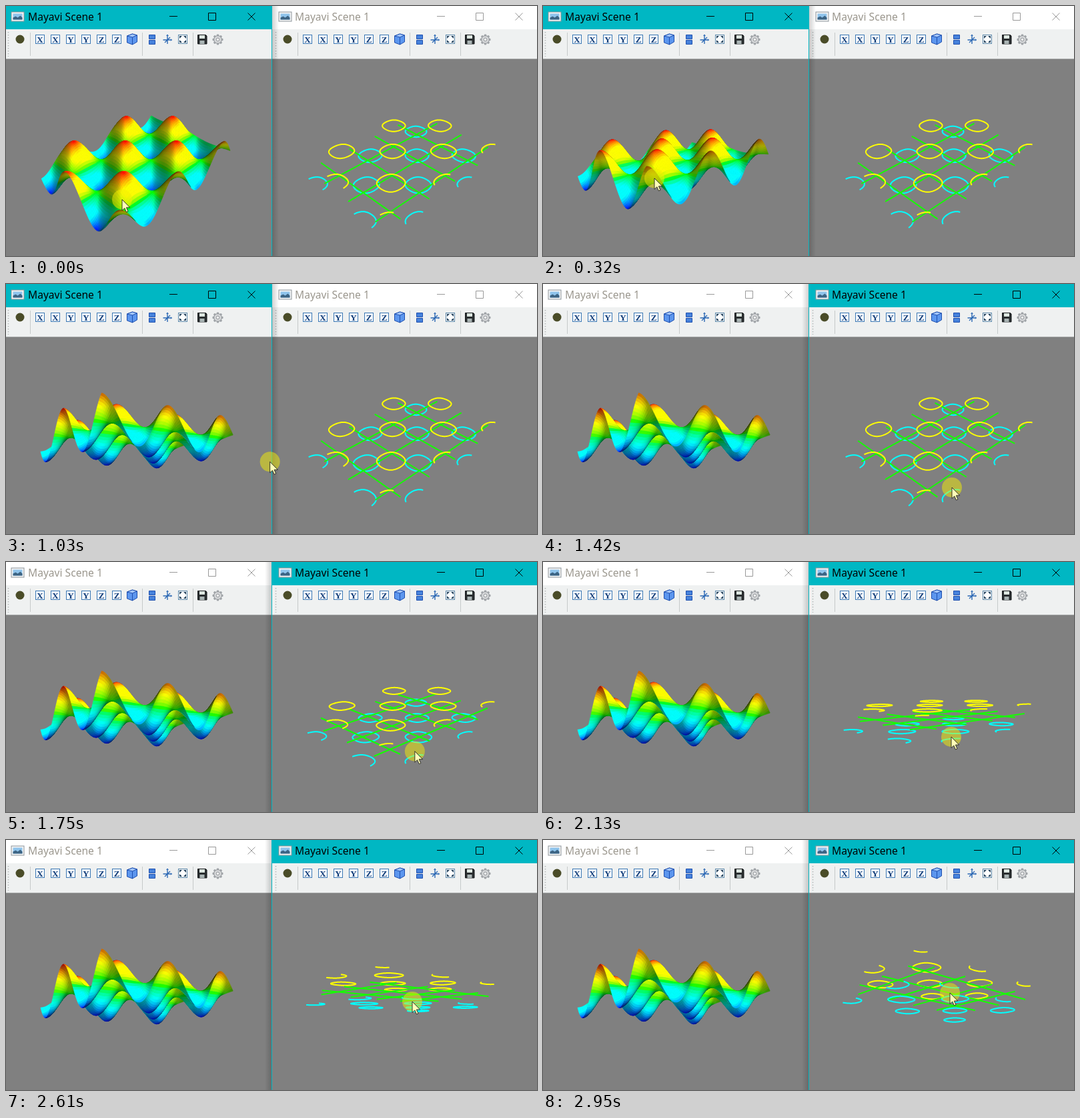
An HTML page with a canvas that plays this animation: 796 px wide and 376 px high, repeating every 3010 ms.

```html
<!DOCTYPE html>
<html lang="en">
<head>
<meta charset="utf-8">
<title>Surface and contours</title>
<style>
  html, body { margin: 0; width: 100%; height: 100%; overflow: hidden; background: #808080; }
  canvas, svg { position: absolute; left: 0; top: 0; width: 796px; height: 376px; }
  .title { font: 15.6px "Noto Sans", "Open Sans", sans-serif; }
  .axis { font: bold 13px "Liberation Serif", "Noto Serif", serif; fill: #123c78; text-anchor: middle; }
  .win { color: #999; }
  .win.on { color: #000; }
  .bar { fill: #fff; }
  .on .bar { fill: #00b7c3; }
  .label { fill: #9b978e; }
  .on .label { fill: #000; }
  .edge { display: none; }
  .on .edge { display: inline; }
</style>
</head>
<body>
<canvas id="scene" width="796" height="376"></canvas>
<svg viewBox="0 0 796 376">
  <defs>
    <linearGradient id="fadeR"><stop stop-opacity=".18"/><stop offset="1" stop-opacity="0"/></linearGradient>
    <linearGradient id="fadeL"><stop stop-opacity="0"/><stop offset="1" stop-opacity=".18"/></linearGradient>
    <g id="photo">
      <rect x="8" y="9" width="19" height="14" fill="#f4f4f4" stroke="#8d959b"/>
      <rect x="10.500" y="11.500" width="14" height="9" fill="#8fc4ec"/>
      <path d="M10.500 20.500v-3l4-2 3 2 4-3 3 3v3z" fill="#3c6484"/>
    </g>
    <g id="controls" fill="none" stroke="currentColor">
      <path d="M245 15.500h12M303.500 10.500h11v11h-11zM362.500 10.500l11 11M373.500 10.500l-11 11"/>
    </g>
    <g id="tools"></g>
    <path id="arrow" d="M0 0v16.500l3.800-3.500 2.600 6 2.600-1.100-2.600-5.900h5.300z"/>
  </defs>
  <g id="wins"></g>
  <g id="pointer">
    <circle r="15" fill="#f4ee04" fill-opacity=".5"/>
    <use href="#arrow" fill="#ffffb8" stroke="#222" stroke-width=".9"/>
  </g>
</svg>
<script>
const $ = id => document.getElementById(id);
const ctx = $('scene').getContext('2d');
const LOOP = 3010, FOCUS = 1420;

// ---- window chrome ----
const axisIcon = (letter, i) => {
  const x = 51 + 23 * i;
  return `<rect x="${x - 6.5}" y="43.500" width="13" height="13" fill="#f5faff" stroke="#3c78b4"/>
    <text class="axis" x="${x}" y="54.500">${letter}</text>`;
};
const teeth = [...Array(8)].map((_, i) =>
  `<rect x="-1.700" y="-8" width="3.400" height="4" rx="1" transform="rotate(${i * 45})"/>`).join('');

$('tools').innerHTML = `
  <path d="M3.500 39v37" stroke="#b4b8b8" stroke-width="1.500" stroke-dasharray="1.500 2.500"/>
  <path d="M36.500 40v35M204.500 40v35M280.500 40v35" stroke="#c6caca"/>
  <circle cx="21" cy="50" r="6.500" fill="#4a4c28"/>
  ${[...'XXYYZZ'].map(axisIcon).join('')}
  <g stroke="#1e4fae" stroke-linejoin="round">
    <path d="M181.500 45l8-3 7 2v10l-7 4-8-3z" fill="#5c96ee"/>
    <path d="M181.500 45l8 2 7-3-7-2z" fill="#a4c8ff"/>
    <path d="M189.500 47v11" fill="none"/>
    <path d="M214.500 43.500h9v6h-9zM214.500 51.500h9v6h-9z" fill="#4682dc"/>
  </g>
  <g stroke="#2c68b4" stroke-width="1.400" fill="none">
    <path d="M242 43v14M235.500 51h13M238 55l8-8"/>
    <path d="M240.500 45l1.500-2 1.500 2M247 49.500l1.500 1.500-1.500 1.500" stroke-width="1"/>
  </g>
  <rect x="258.500" y="43.500" width="13" height="13" fill="#fff" stroke="#5a86a8"/>
  <path d="M260 45h4l-4 4zM270 45v4l-4-4zM270 55h-4l4-4zM260 55v-4l4 4z" fill="#1c3c58"/>
  <path d="M287.500 43.500h12l1.500 1.500v12h-13.500z" fill="#2a2e30" stroke="#15191b"/>
  <path d="M290 44h8v5h-8z" fill="#dce6e0"/><path d="M290.500 52h7v5h-7z" fill="#a9b4b4"/>
  <g transform="translate(317.500 50.500)" fill="#a2a6aa">
    ${teeth}<circle r="5.800" fill="#d4d6d8" stroke="#92969a"/>
    <circle r="2.300" fill="#f4f4f4" stroke="#92969a"/>
  </g>`;

const frame = (id, left, dx, edge) => `
  <g id="${id}" class="win">
    <rect class="bar" x="${left}" width="${id === 'w0' ? 399 : 398}" height="35"/>
    <rect x="${left}" y="35" width="${id === 'w0' ? 398 : 397}" height="44" fill="#eff1f1"/>
    <path d="M${left} 79.500h398" stroke="#b4b6b6"/>
    <g transform="translate(${dx})">
      <use href="#photo"/><use href="#controls"/><use href="#tools"/>
      <text class="title label" x="${dx ? 32 : 33}" y="22">Mayavi Scene 1</text>
    </g>
    <g class="edge">
      <path d="M398.500 0v376" stroke="#00b7c3"/>
      <rect x="${edge}" width="10" height="376" fill="url(#${id === 'w0' ? 'fadeR' : 'fadeL'})"/>
    </g>
  </g>`;
$('wins').innerHTML = frame('w1', 399, 401, 388) + frame('w0', 0, 0, 399);

// ---- pointer steps and trackball cameras ----
const times = [0, 120, 190, 260, 320, 390, 470, 550, 630, 710, 790, 870, 950, 1030, 1100,
  1180, 1270, 1340, 1420, 1550, 1610, 1750, 1830, 1900, 1980, 2060, 2130, 2220, 2300,
  2380, 2450, 2530, 2610, 2690, 2770, 2860, 2950];
// steps, end x, end y, dragged view (-1: none)
const legs = [[4, 167, 259, 0], [4, 160, 225, 0], [1, 159, 222, 0], [6, 514, 290, -1],
  [2, 613, 306, -1], [1, 613, 306, -1], [2, 613, 289, 1], [6, 612, 263, 1],
  [6, 609, 243, 1], [4, 610, 230, 1]];

const DIST = 34.1;
const dot = (a, b) => a[0] * b[0] + a[1] * b[1] + a[2] * b[2];
const cross = (a, b) => [a[1] * b[2] - a[2] * b[1], a[2] * b[0] - a[0] * b[2], a[0] * b[1] - a[1] * b[0]];
const turn = (a, b, t) => a.map((v, i) => v * Math.cos(t) + b[i] * Math.sin(t));

function orbit(cam, dx, dy) {
  const az = -dx * 200 / 398 * Math.PI / 180;
  const el = dy * 200 / 302 * Math.PI / 180;
  const out = turn(cam.out, cam.right, az);
  const up = turn(cam.up, out, -el);
  const dir = turn(out, cam.up, el);
  return { out: dir, up, right: cross(up, dir) };
}

const s3 = 1 / Math.sqrt(3), s6 = 1 / Math.sqrt(6), s2 = Math.SQRT1_2;
const home = { out: [s3, s3, s3], up: [-s6, -s6, 2 * s6], right: [-s2, s2, 0] };
const states = [{ x: 174, y: 291, cams: [home, home] }];
for (const [n, ex, ey, view] of legs) {
  const from = states[states.length - 1];
  for (let i = 1; i <= n; i++) {
    const last = states[states.length - 1];
    const x = from.x + (ex - from.x) * i / n, y = from.y + (ey - from.y) * i / n;
    const cams = last.cams.slice();
    if (view >= 0) cams[view] = orbit(cams[view], x - last.x, y - last.y);
    states.push({ x, y, cams });
  }
}

function projector(cam, cx, cy, focal) {
  return p => {
    const depth = DIST - dot(p, cam.out), k = focal / depth;
    return [cx + dot(p, cam.right) * k, cy - dot(p, cam.up) * k, depth];
  };
}

// ---- surface: sin(x - y) + cos(x + y) on [-7, 7] x [-5, 5] ----
const height = (x, y) => Math.sin(x - y) + Math.cos(x + y);
const NX = 112, NY = 80;
const gx = i => -7 + 14 * i / NX, gy = j => -5 + 10 * j / NY;
const clamp = v => Math.max(0, Math.min(1, v));
const light = (el, az, power) => {
  const e = el * Math.PI / 180, a = az * Math.PI / 180;
  return { dir: [Math.cos(e) * Math.sin(a), Math.sin(e), Math.cos(e) * Math.cos(a)], power };
};
const lights = [light(45, 45, 1.3), light(-30, -60, .55), light(-30, 60, .45)];

// wide cyan and yellow bands between blue and red
const ramp = f => [4 * f - 2, Math.min(4 * f, 4 - 4 * f), 2 - 4 * f].map(c => clamp(c) ** .55);

function shade(x, y, cam) {
  const z = height(x, y);
  let n = [Math.sin(x + y) - Math.cos(x - y), Math.cos(x - y) + Math.sin(x + y), 1];
  const toEye = cam.out.map((v, i) => v * DIST - [x, y, z][i]);
  const len = Math.hypot(...n) * (dot(n, toEye) < 0 ? -1 : 1);
  n = [cam.right, cam.up, cam.out].map(a => dot(n, a) / len);
  let lit = 0;
  for (const l of lights) lit += l.power * Math.max(0, dot(n, l.dir));
  return `rgb(${ramp((z + 2) / 4).map(c => Math.round(255 * clamp(c * lit)))})`;
}

function drawSurface(cam) {
  const put = projector(cam, 198, 232.5, 572);
  const pts = [];
  for (let i = 0; i <= NX; i++) {
    pts.push([]);
    for (let j = 0; j <= NY; j++) pts[i].push(put([gx(i), gy(j), height(gx(i), gy(j))]));
  }
  const quads = [];
  for (let i = 0; i < NX; i++) for (let j = 0; j < NY; j++) {
    const c = [pts[i][j], pts[i + 1][j], pts[i + 1][j + 1], pts[i][j + 1]];
    quads.push({ c, i, j, depth: c[0][2] + c[1][2] + c[2][2] + c[3][2] });
  }
  quads.sort((a, b) => b.depth - a.depth);
  ctx.lineWidth = .6;
  ctx.lineJoin = 'round';
  for (const { c, i, j } of quads) {
    ctx.fillStyle = ctx.strokeStyle = shade(gx(i + .5), gy(j + .5), cam);
    ctx.beginPath();
    c.forEach(p => ctx.lineTo(p[0], p[1]));
    ctx.closePath();
    ctx.fill();
    ctx.stroke();
  }
}

// ---- contours at -1, 0 and 1 ----
const ring = [...Array(121)].map((_, i) => {
  const t = i * Math.PI / 60, c = Math.cos(t), s = Math.sin(t);
  let lo = 0, hi = Math.PI / 2;
  for (let k = 0; k < 30; k++) {
    const r = (lo + hi) / 2;
    if (Math.cos(r * c) * Math.cos(r * s) > .5) lo = r; else hi = r;
  }
  return [lo * c, lo * s];
});
const curves = { '-1': [], 0: [], 1: [] };
for (let k = -2; k <= 2; k++) {
  const x = Math.PI * (k + .25);
  for (let m = -2; m <= 2; m++) {
    const y = Math.PI * (m - .25);
    const z = (k + m) % 2 ? -1 : 1;
    let run = [];
    for (const [a, b] of ring) {
      const p = [x + a, y + b, z];
      if (Math.abs(p[0]) <= 7 && Math.abs(p[1]) <= 5) run.push(p);
      else if (run.length) { curves[z].push(run); run = []; }
    }
    if (run.length) curves[z].push(run);
  }
  const zx = Math.PI * (k - .25), zy = Math.PI * (k + .25);
  if (Math.abs(zx) < 7) curves[0].push([[zx, -5, 0], [zx, 5, 0]]);
  if (Math.abs(zy) < 5) curves[0].push([[-7, zy, 0], [7, zy, 0]]);
}
const inks = { '-1': '#00ffff', 0: '#14ff00', 1: '#ffff00' };

function drawContours(cam) {
  const put = projector(cam, 598.6, 232.3, 576);
  const order = cam.out[2] > 0 ? [-1, 0, 1] : [1, 0, -1];
  ctx.lineWidth = 2;
  for (const z of order) {
    ctx.strokeStyle = inks[z];
    ctx.beginPath();
    for (const line of curves[z]) line.map(put).forEach((p, i) =>
      i ? ctx.lineTo(p[0], p[1]) : ctx.moveTo(p[0], p[1]));
    ctx.stroke();
  }
}

// ---- playback ----
const start = performance.now();
let shown = -1, drawn = [];

function redraw(view, cam) {
  if (drawn[view] === cam) return;
  drawn[view] = cam;
  ctx.fillStyle = '#808080';
  ctx.fillRect(view * 399, 0, 399, 376);
  (view ? drawContours : drawSurface)(cam);
}

function tick() {
  const t = (performance.now() - start) % LOOP;
  let step = times.length - 1;
  while (times[step] > t) step--;
  if (step !== shown) {
    shown = step;
    const s = states[step], right = times[step] >= FOCUS;
    s.cams.forEach((cam, view) => redraw(view, cam));
    $('w0').classList.toggle('on', !right);
    $('w1').classList.toggle('on', right);
    $('wins').append($(right ? 'w1' : 'w0'));
    $('pointer').setAttribute('transform', `translate(${s.x} ${s.y})`);
  }
  requestAnimationFrame(tick);
}
tick();
</script>
</body>
</html>
```
